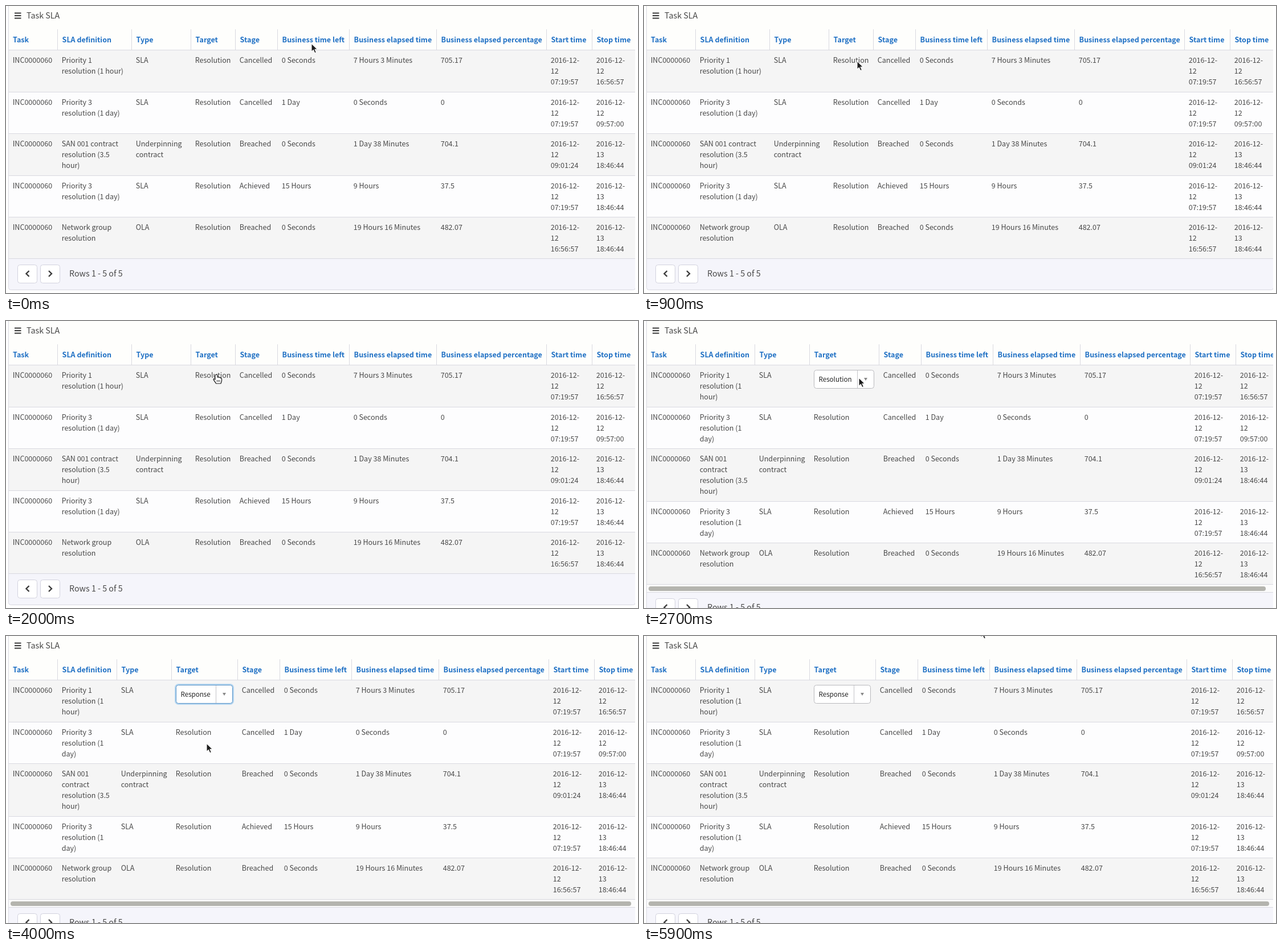
Write an HTML page that moves like this. It is 1109 by 505 pixels and loops after 6400 ms.

```html
<!DOCTYPE html>
<html lang="en">
<head>
<meta charset="utf-8">
<title>Task SLA</title>
<style>
html, body { margin: 0; width: 100%; height: 100%; overflow: hidden; background: #fff; }
svg { display: block; width: 1109px; height: 505px; }
text {
  font-family: "Noto Sans CJK JP", "Noto Sans CJK SC", "Source Sans Pro", "Noto Sans", sans-serif;
  font-size: 12.54px; fill: #484848; white-space: pre;
}
.head { font-weight: 700; fill: #1f70c4; }
.large { font-size: 14.3px; }
.choice { font-size: 11.6px; fill: #222; }
.item { fill: #111; }
.line { stroke: #d9d9e0; fill: none; }
.button { fill: #fff; stroke: #d2d2de; }
</style>
</head>
<body>
<svg id="stage" viewBox="0 0 1109 505">
  <defs>
    <clipPath id="panel"><rect x="4" y="0" width="1100" height="505"/></clipPath>
    <linearGradient id="pressed" x1="0" y1="0" x2="0" y2="1">
      <stop offset="0" stop-color="#f4f4f4"/><stop offset="1" stop-color="#e6e6e6"/>
    </linearGradient>
    <filter id="shadow" x="-20%" y="-20%" width="140%" height="150%">
      <feDropShadow dx="0" dy="2" stdDeviation="2" flood-opacity=".28"/>
    </filter>
  </defs>
  <g id="tables"></g>
  <g id="select"></g>
  <g id="cursor"></g>
</svg>
<script>
const LOOP = 6400, STEP = 100;
const $ = id => document.getElementById(id);

const headings = ['Task', 'SLA definition', 'Type', 'Target', 'Stage', 'Business time left',
  'Business elapsed time', 'Business elapsed percentage', 'Start time', 'Stop time'];

// Definition holds the wide wrapping, then the narrow one.
const rows = [
  { def: ['Priority 1|resolution (1 hour)', 'Priority 1|resolution (1|hour)'], type: 'SLA',
    rest: ['Cancelled', '0 Seconds', '7 Hours 3 Minutes', '705.17', '12|07:19:57', '12|16:56:57'] },
  { def: ['Priority 3|resolution (1 day)', 'Priority 3|resolution (1|day)'], type: 'SLA',
    rest: ['Cancelled', '1 Day', '0 Seconds', '0', '12|07:19:57', '12|09:57:00'] },
  { def: ['SAN 001 contract|resolution (3.5|hour)', 'SAN 001|contract|resolution (3.5|hour)'],
    type: 'Underpinning|contract',
    rest: ['Breached', '0 Seconds', '1 Day 38 Minutes', '704.1', '12|09:01:24', '13|18:46:44'] },
  { def: ['Priority 3|resolution (1 day)', 'Priority 3|resolution (1|day)'], type: 'SLA',
    rest: ['Achieved', '15 Hours', '9 Hours', '37.5', '12|07:19:57', '13|18:46:44'] },
  { def: ['Network group|resolution', 'Network group|resolution'], type: 'OLA',
    rest: ['Breached', '0 Seconds', '19 Hours 16 Minutes', '482.07', '12|16:56:57', '13|18:46:44'] }
];

const layouts = {
  plain: { type: 220, target: 324, stage: 402 },
  wide: { type: 194, target: 290, stage: 412, scrollEnd: 1091 },
  narrow: { type: 194, target: 290, stage: 406, scrollEnd: 1097 }
};

const rect = (x, y, w, h, attrs) => `<rect x="${x}" y="${y}" width="${w}" height="${h}" ${attrs}/>`;
const path = (d, attrs) => `<path d="${d}" ${attrs}/>`;
const text = (x, y, content, cls = '') => `<text x="${x}" y="${y}" class="${cls}">${content}</text>`;
const lines = (x, y, content) => content.split('|').map((part, i) => text(x, y + 19 * i, part)).join('');
const rule = y => path(`M4 ${y + .5}H1104`, 'class="line"');

function footer(top, bottom) {
  const mid = top + 27;
  const button = (x, d) => rect(x + .5, top + 11.5, 34, 32, 'rx="4" class="button"') +
    path(d, 'fill="none" stroke="#3c3c3c" stroke-width="2.4"');
  return path(`M4.5 ${top}H1104.5V${bottom - 4}q0 4-4 4H8.5q-4 0-4-4Z`, 'fill="#f5f5fb"') + rule(top) +
    button(20, `M40.5 ${mid - 5}l-5 5l5 5`) + button(60, `M75 ${mid - 5}l5 5l-5 5`) +
    text(111, top + 32, 'Rows 1 - 5 of 5', 'large');
}

function table({ type, target, stage, scrollEnd }) {
  const edges = [4, 90, type, target, ...[0, 74, 200, 353, 546, 626].map(dx => stage + dx)];
  let out = rect(4, 0, 1100, 505, `fill="${scrollEnd ? '#fbfbfb' : '#fff'}"`) +
    rect(4, 0, 1100, 77, 'fill="#fefefc"') +
    path('M15 12.5h11.5m-11.5 4.5h11.5m-11.5 4.5h11.5', 'stroke="#3a3a3a" stroke-width="2"') +
    text(36, 22, 'Task SLA', 'large');
  edges.forEach((x, i) => {
    if (i) out += path(`M${x + .5} 41V77`, 'class="line"');
    out += text(x + (i ? 8.6 : 8), 63.5, headings[i], 'head');
  });

  let top = 77;
  rows.forEach((row, i) => {
    const def = row.def[scrollEnd ? 1 : 0];
    const height = 16.6 + 19 * Math.max(3, def.split('|').length);
    const y = Math.round(top), next = Math.round(top + height);
    const editing = scrollEnd && i === 0;
    const rest = row.rest.map((value, k) => k > 3 ? '2016-12-|' + value : value);
    const cells = ['INC0000060', def, row.type, editing ? '' : 'Resolution', ...rest];
    out += rect(4, y, 1100, next - y, `fill="${i % 2 ? '#fdfdfe' : '#f5f5f5'}"`) + rule(y);
    cells.forEach((cell, k) => { out += lines(edges[k] + 7.7, y + 22.5, cell); });
    top += height;
  });

  const end = Math.round(top) - 1;
  out += rule(end);
  if (scrollEnd) out += rect(8, 467, scrollEnd - 8, 8, 'rx="4" fill="#b4b4ae"');
  const bottom = scrollEnd ? 540 : 499.5;
  out += footer(scrollEnd ? 477 : end, bottom);
  return out + path(`M4.5 0V${bottom - 4}q0 4 4 4H1100.5q4 0 4-4V0`, 'class="line"');
}

function closedSelect(label, width, focus) {
  const right = 298 + width, split = right - 29.5, mid = right - 15;
  const glow = focus ? rect(297.5, 85.5, width + 1, 34,
    `rx="5" fill="none" stroke="#66afe9" stroke-opacity="${.45 * focus}" stroke-width="3"`) : '';
  const border = focus > .5 ? '#5a94c8' : '#b9b9bd';
  return glow + rect(298.5, 86.5, width - 1, 32, `rx="4" fill="#fff" stroke="${border}"`) +
    path(`M${split} 87V118`, 'stroke="#c4c4c8"') + text(306.5, 106.5, label, 'choice') +
    path(`M${mid - 3} 100h6l-3 5Z`, 'fill="#888"');
}

function openSelect(pointerY) {
  const active = Math.max(0, Math.min(2, Math.floor((pointerY - 153.5) / 26.8)));
  let out = path('M298.5 118V235q0 4 4 4H399.5q4 0 4-4V118Z',
      'fill="#fff" stroke="#a9b2bb" filter="url(#shadow)"') +
    path('M298.5 118.5V90.5q0-4 4-4H399.5q4 0 4 4V118.5', 'fill="url(#pressed)" stroke="#4f9cc4" stroke-width="1.3"') +
    text(306.5, 106.5, 'Resolution', 'choice') + path('M385 104h7l-3.5-5Z', 'fill="#777"') +
    rect(303.5, 121.5, 95, 28, 'rx="3" fill="#fff" stroke="#b8b8bc"') +
    '<circle cx="385" cy="132" r="3.6" fill="none" stroke="#666" stroke-width="1.6"/>' +
    path('M387.7 134.7l4.2 4.2', 'stroke="#666" stroke-width="2.2"');
  out += rect(303, Math.round(154.2 + 26.8 * active), 96, 27, 'fill="#3a86ea"');
  ['-- None --', 'Response', 'Resolution'].forEach((label, i) => {
    out += `<text x="309.5" y="${172 + 26.8 * i}" style="fill:${i === active ? '#fff' : '#111'}">${label}</text>`;
  });
  return out;
}

const arrow = path('M0 0V14.5L3.4 11.4L5.8 16.8L8.4 15.7L6.1 10.4H10.6Z',
  'fill="#1c1c1c" stroke="#fff" stroke-width="1.1"');
const hand = path('M-2 1.5Q0-1 2 1.5V5Q4 4 5 5.5Q7 4.8 7.5 6.5Q9.5 6 9.5 8.5V11Q9 13 8 16H-.5Q-2 13-4.5 10Q-5.5 7.5-4 7.5L-2 9Z',
  'fill="#fff" stroke="#1c1c1c" stroke-width="1.2" stroke-linejoin="round"') +
  path('M1.3 10v3m2.3-3v3m2.3-3v3', 'stroke="#1c1c1c" stroke-width=".9"');

// Pointer stops: time, x, y
const stops = [[0, 536, 66], [100, 536, 66], [850, 374, 97], [1300, 374, 97], [1500, 369, 94],
  [2100, 369, 94], [2500, 377, 100], [2900, 377, 100], [3500, 353, 181], [3700, 352, 189],
  [4200, 352, 189], [4700, 591, -12], [LOOP, 591, -12]];

function pointerAt(t) {
  const i = stops.findIndex((stop, k) => k && t <= stop[0]);
  const [t0, x0, y0] = stops[i - 1], [t1, x1, y1] = stops[i];
  const p = (t - t0) / (t1 - t0), e = p * p * (3 - 2 * p);
  return [x0 + (x1 - x0) * e, y0 + (y1 - y0) * e];
}

$('tables').innerHTML = Object.entries(layouts)
  .map(([name, layout]) => `<g id="${name}" clip-path="url(#panel)">${table(layout)}</g>`).join('');

function render(t) {
  const layout = t < 2100 ? 'plain' : t < 3800 ? 'wide' : 'narrow';
  for (const name in layouts) $(name).style.display = name === layout ? '' : 'none';

  const [x, y] = pointerAt(t);
  const focus = t < 5000 ? 1 : t < 5100 ? .5 : 0;
  $('select').innerHTML = layout === 'plain' ? '' :
    layout === 'narrow' ? closedSelect('Response', 100, focus) :
    t < 2900 ? closedSelect('Resolution', 106, 0) : openSelect(y);

  const pointing = (t >= 1500 && t < 2100) || (t >= 3100 && t < 3800);
  $('cursor').innerHTML = pointing ? hand : arrow;
  $('cursor').setAttribute('transform', `translate(${x.toFixed(1)} ${y.toFixed(1)})`);
}

const start = performance.now();
let shown = -1;
function tick() {
  const t = Math.floor((performance.now() - start) % LOOP / STEP) * STEP;
  if (t !== shown) render(shown = t);
  requestAnimationFrame(tick);
}
tick();
</script>
</body>
</html>
```
